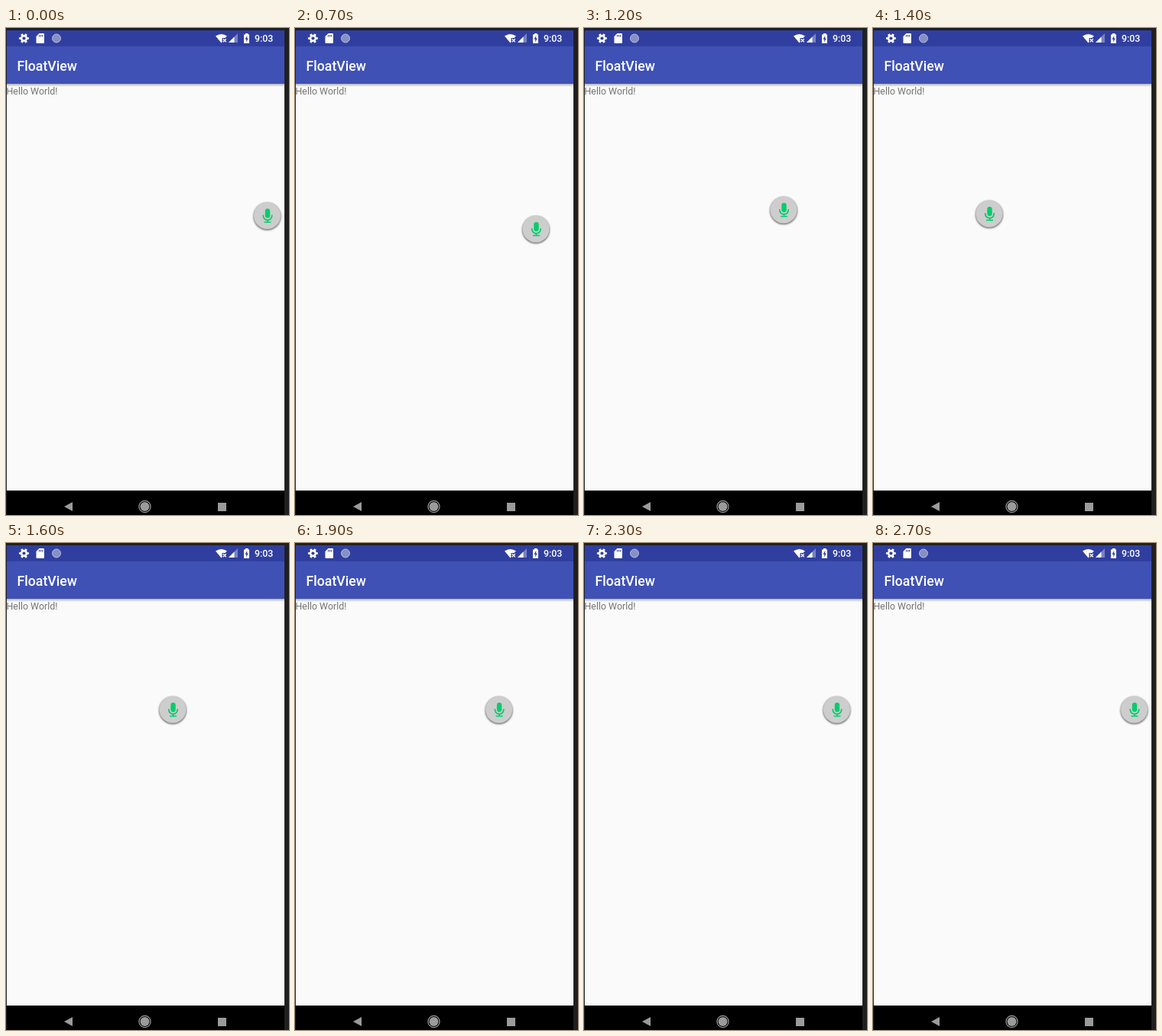
An HTML page that plays this animation: 370 by 637 pixels, repeating every 3.3 s.

```html
<!DOCTYPE html>
<html lang="en">
<head>
<meta charset="utf-8">
<title>FloatView</title>
<style>
  html, body { margin: 0; width: 100%; height: 100%; overflow: hidden; background: #202020; }
  svg { display: block; }
  text { font-family: Roboto, sans-serif; }
</style>
</head>
<body>
<svg width="370" height="637" viewBox="0 0 370 637">
  <defs>
    <linearGradient id="barShadow" x2="0" y2="1">
      <stop stop-color="#000" stop-opacity=".28"/>
      <stop offset="1" stop-color="#000" stop-opacity="0"/>
    </linearGradient>
    <filter id="soft" x="-30%" y="-30%" width="160%" height="160%">
      <feGaussianBlur stdDeviation="1.1"/>
    </filter>
  </defs>

  <rect width="370" height="637" fill="#202020"/>
  <rect x="1" y="3" width="363" height="21" fill="#303f9f"/>
  <rect x="1" y="24" width="363" height="49" fill="#3f51b5"/>
  <rect x="1" y="73" width="363" height="532" fill="#fafafa"/>
  <rect x="1" y="73" width="363" height="4" fill="url(#barShadow)"/>
  <rect x="1" y="605" width="363" height="32"/>

  <text x="14.5" y="55.5" font-size="17.7" font-weight="500" fill="#fff">FloatView</text>
  <text x="0.5" y="87" font-size="12.4" fill="#757575">Hello World!</text>
  <text x="325" y="18" font-size="12.4" font-weight="500" fill="#fff">9:03</text>

  <g id="status" fill="#fff">
    <g fill="none" stroke="#fff">
      <circle cx="23.5" cy="13.5" r="3.4" stroke-width="2.6"/>
      <circle cx="23.5" cy="13.5" r="5.2" stroke-width="2.4" pathLength="12" stroke-dasharray="1" stroke-dashoffset=".5"/>
    </g>
    <path d="M43.5 7H49q1 0 1 1V19q0 1-1 1H40.500q-1 0-1-1V11Z"/>
    <path d="M43.500 9v2.500M45.500 9v2.500M47.500 9v2.500" stroke="#303f9f"/>
    <circle cx="66" cy="13.500" r="5.500" fill="#8790c5" stroke="#b5bbdc"/>
    <path d="M274 10.500Q281.500 5.500 289 10.500L286.500 13H282.500V18.500L281.500 19.500Z"/>
    <path d="m283.800 14.200 4 4m0-4-4 4" stroke="#fff" stroke-width="1.300"/>
    <path d="M303 7V19H291Z" opacity=".35"/>
    <path d="M298.500 11.500V19H291Z"/>
    <path d="M313 7h3.500v1.500H318V20h-7V8.500h2Z"/>
    <path d="M315.200 10 312.500 14.800h1.700V18.500L316.800 13.500h-1.600Z" fill="#303f9f"/>
  </g>

  <g id="navigation" fill="#9b9b9b">
    <path d="M76 626 87 620V632Z"/>
    <circle cx="181.500" cy="626" r="6"/>
    <circle cx="181.500" cy="626" r="7.600" fill="none" stroke="#9b9b9b" stroke-width="1.200"/>
    <rect x="277" y="621" width="11" height="11"/>
  </g>

  <g id="button">
    <circle cy="1" r="18" opacity=".55" filter="url(#soft)"/>
    <circle r="17.500" fill="#cdcdcd"/>
    <g fill="none" stroke="#07cc6c" stroke-width="1.700">
      <rect x="-2.700" y="-9.300" width="6.400" height="12.300" rx="3.200" fill="#07cc6c" stroke="none"/>
      <path d="M-5.200-1V0A5.700 5.700 0 0 0 6.200 0V-1M.5 5.700V8.500M-4 8.500H5"/>
    </g>
  </g>
</svg>
<script>
const LOOP = 3300, STEP = 100;
const DRAG_START = 700, BOUNCE_START = 1718, BOUNCE_TIME = 921;
const HOME = [341.5, 245.5], EDGE = 341.5;
const DRAG = [
  [315, 263], [281, 271], [212, 159], [114, 196], [152, 240],
  [261, 238], [170, 270], [152, 243], [216, 215], [218, 218]
];
const button = document.getElementById("button");

// Falls onto the edge, then rebounds three times.
function bounce(p) {
  const t = p * 1.1226;
  if (t < 0.3535) return 8 * t * t;
  if (t < 0.7408) return 8 * (t - 0.54719) ** 2 + 0.7;
  if (t < 0.9644) return 8 * (t - 0.8526) ** 2 + 0.9;
  return 8 * (t - 1.0435) ** 2 + 0.95;
}

function position(time) {
  if (time < DRAG_START) return HOME;
  const index = (time - DRAG_START) / STEP;
  if (index < DRAG.length) return DRAG[index];
  const [x, y] = DRAG[DRAG.length - 1];
  const p = Math.min(1, Math.max(0, (time - BOUNCE_START) / BOUNCE_TIME));
  return [p === 1 ? EDGE : x + (EDGE - x) * bounce(p), y];
}

function draw(now) {
  const time = Math.floor((now % LOOP) / STEP) * STEP;
  button.setAttribute("transform", `translate(${position(time)})`);
  requestAnimationFrame(draw);
}
draw(performance.now());
</script>
</body>
</html>
```
